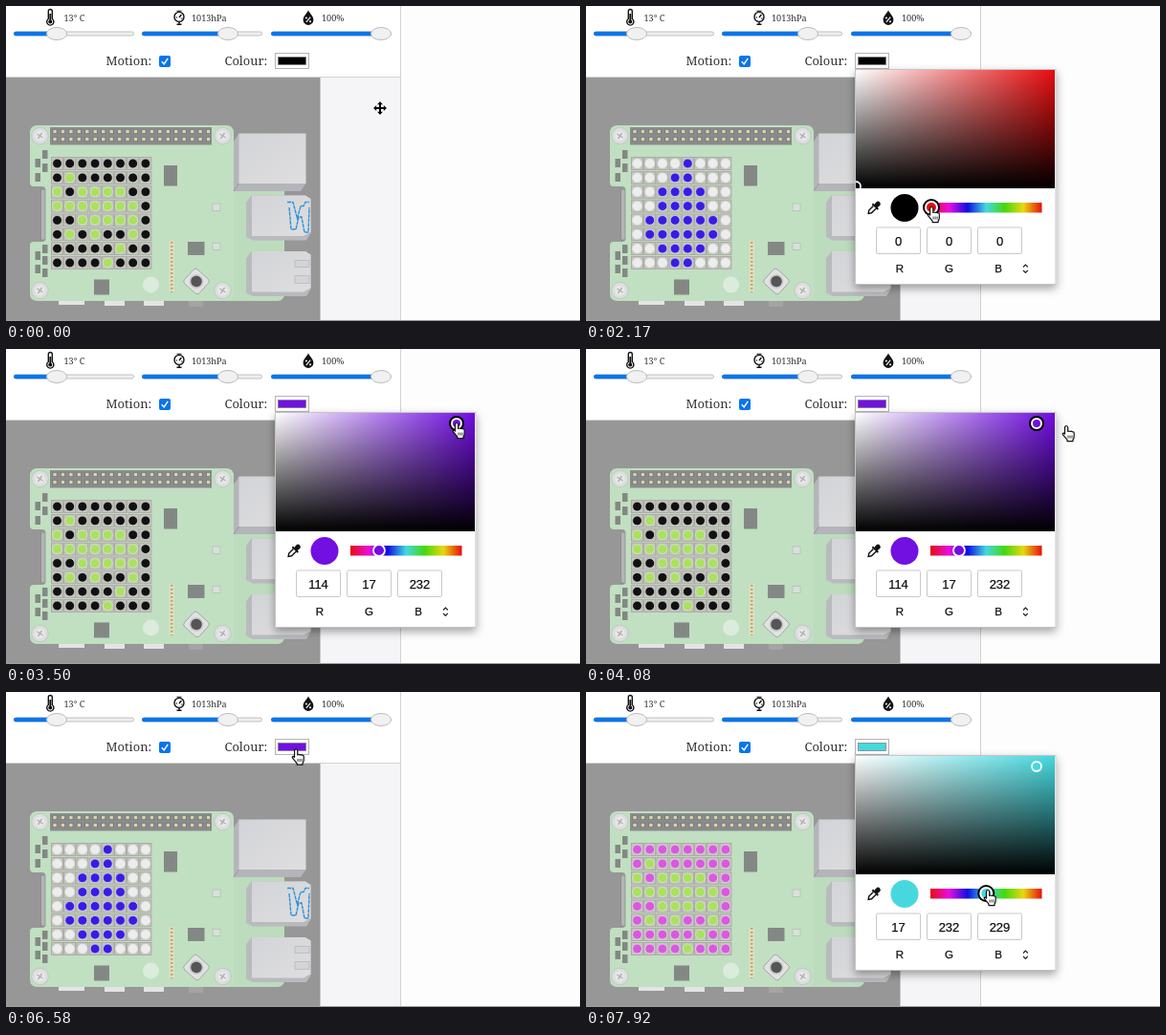
These frames come from a looping animation (600 by 330 pixels, 8000 ms). An HTML page:

```html
<!DOCTYPE html>
<html lang="en">
<head>
<meta charset="utf-8">
<title>Board emulator</title>
<style>
html, body { margin: 0; width: 100%; height: 100%; overflow: hidden; background: #fdfdfd; }
svg { display: block; }
.serif { font-family: "Noto Serif", serif; fill: #333; }
.sans { font-family: "Liberation Sans", Arial, sans-serif; fill: #111; stroke: #111; stroke-width: .25; text-anchor: middle; }
.cursor { paint-order: stroke; stroke-linejoin: round; }
</style>
</head>
<body>
<svg id="stage" width="600" height="330" viewBox="0 0 600 330">
  <defs>
    <linearGradient id="toWhite"><stop stop-color="#fff"/><stop offset="1" stop-color="#fff" stop-opacity="0"/></linearGradient>
    <linearGradient id="toBlack" x2="0" y2="1"><stop stop-opacity="0"/><stop offset="1"/></linearGradient>
    <linearGradient id="hues"></linearGradient>
    <linearGradient id="metal" x2="1" y2="1"><stop stop-color="#d3d4d8"/><stop offset="1" stop-color="#dededf"/></linearGradient>
    <filter id="shadow" x="-10%" y="-10%" width="120%" height="125%">
      <feDropShadow dx="0" dy="4" stdDeviation="5" flood-opacity=".36"/>
    </filter>
    <clipPath id="fieldClip"><rect x="282" y="67" width="208" height="124"/></clipPath>
  </defs>

  <!-- Page -->
  <rect width="600" height="330" fill="#fdfdfd"/>
  <rect width="412" height="75" fill="#fff"/>
  <rect x="328" y="75" width="84" height="254" fill="#f5f5f8"/>
  <rect y="75" width="328.5" height="254" fill="#979797"/>
  <path d="M0 74.5H412M412.5 0V329" stroke="#d2d2d6"/>

  <!-- Controls -->
  <g id="sliders"></g>
  <g fill="none" stroke="#111" stroke-width="1.4">
    <path d="M44.3 13.5V5.5a2 2 0 0 1 4 0v8a3.6 3.6 0 1 1-4 0z"/>
    <path d="M46.3 8v8" stroke-width="1.8"/><circle cx="46.3" cy="16.6" r="2" fill="#111" stroke="none"/>
    <circle cx="181" cy="11.4" r="5"/><path d="M181 12l2.4-3M177.8 12h1M183.4 13h1M178.5 19.2h5M181 17v2"/>
    <path d="M178.5 5.2h5" stroke-width="1"/>
  </g>
  <path d="M316 4.5c2.2 3.8 5.4 6.6 5.4 10a5.4 5.4 0 0 1-10.8 0c0-3.4 3.2-6.2 5.4-10z" fill="#111"/>
  <path d="M313.8 16.8l4.4-5.2" stroke="#fff" stroke-width="1.1"/>
  <circle cx="313.9" cy="12.4" r="1" fill="#fff"/><circle cx="318" cy="16.2" r="1" fill="#fff"/>
  <g class="serif" font-size="9.1">
    <text x="60.5" y="15.5">13° C</text><text x="194" y="15.5">1013hPa</text><text x="330" y="15.5">100%</text>
  </g>
  <g class="serif" font-size="12.9"><text x="104.5" y="62">Motion:</text><text x="228.5" y="62">Colour:</text></g>
  <rect x="160" y="52" width="12" height="12" rx="2" fill="#0875ec"/>
  <path d="M162.8 58.2l2.4 2.7 4-6" fill="none" stroke="#fff" stroke-width="1.5"/>
  <rect x="281.5" y="49.5" width="35" height="16" fill="#fff" stroke="#b4b4b4"/>
  <rect id="swatch" x="284.5" y="53.5" width="29" height="8" stroke="#777" stroke-width=".7"/>

  <!-- Board -->
  <rect x="180" y="180" width="111" height="129" rx="7" fill="#bcdcbd"/>
  <g fill="#e4e4e6">
    <path d="M55 308h27v5H55zM103 308h21v6h-21zM144 308h21v6h-21z"/>
    <path d="M191 308h15v7h-15z" fill="#a4a4a4"/>
  </g>
  <path d="M33 125H230q8 0 8 8V301q0 8-8 8H33q-8 0-8-8V251q0-4 4-4h9q3 0 3-3V192q0-3-3-3H29q-4 0-4-4V133q0-8 8-8z" fill="#c1dfc1"/>
  <rect x="36.5" y="192" width="4.5" height="53" fill="#b3b4b6" stroke="#808080" stroke-width=".6"/>
  <g id="header"></g>
  <g id="screws"></g>
  <g id="chips" fill="#838885"></g>
  <g fill="#d9e0db" stroke="#aebfae" stroke-width=".7"><rect x="216" y="207" width="8" height="7.5"/><rect x="216" y="248.5" width="8" height="7"/></g>
  <path d="M170.5 246h5.5v54h-5.5z" fill="#dedfc6"/>
  <path d="M173.2 247v53" stroke="#c2a55c" stroke-width="2.5" stroke-dasharray="1.8 2.2"/>
  <circle cx="151.5" cy="292" r="8.5" fill="#dcecdc"/>
  <g transform="translate(199 288.5) rotate(42)">
    <rect x="-10.5" y="-10" width="21" height="20" rx="3" fill="#e2e2e3" stroke="#98a098" stroke-width=".8"/>
    <circle r="7.5" fill="#c8c9ca"/><circle r="5.8" fill="#555"/>
  </g>
  <path d="M243.5 133.5L238 142V194H308L313.5 186z" fill="#b4b5ba"/>
  <path d="M243.5 133.5h70V186h-70z" fill="url(#metal)"/>
  <path d="M243.5 186L238 194" stroke="#999"/>
  <g id="ports"></g>
  <path d="M294 205.5h6l4.5 17 3.5-13h3l2-4h4M296 211l2 23h5l3-13h3l3 16h4l1-26" fill="none" stroke="#2b92dc" stroke-width="1.4" stroke-dasharray="4 .7"/>
  <g id="leds"></g>
  <path d="M0 329.5H600" stroke="#a0a0a0"/>

  <!-- Colour picker -->
  <g id="picker">
    <rect x="281" y="66" width="210.5" height="226" rx="1" fill="#fff" filter="url(#shadow)"/>
    <rect x="281.5" y="66.5" width="209.5" height="225" fill="#fff" stroke="#c4c4c4"/>
    <rect id="field" x="282" y="67" width="208" height="124"/>
    <rect x="282" y="67" width="208" height="124" fill="url(#toWhite)"/>
    <rect x="282" y="67" width="208" height="124" fill="url(#toBlack)"/>
    <g clip-path="url(#fieldClip)"><g id="fieldThumb"></g></g>
    <g transform="translate(301 211.5) rotate(45)" fill="#111">
      <rect x="-2.5" y="-8.5" width="5" height="6.5" rx="2.3"/><rect x="-4.2" y="-3" width="8.4" height="2.2" rx=".8"/>
      <path d="M-1.9-1V5.5L0 8.3 1.9 5.5V-1" fill="#fff" stroke="#111" stroke-width="1.4"/>
    </g>
    <circle id="sample" cx="333" cy="211.5" r="14.5"/>
    <rect x="360" y="206" width="116.5" height="10.5" fill="url(#hues)"/>
    <g id="hueThumb"></g>
    <g id="inputs"></g>
    <path d="M457 273.5l2.4-2.4 2.4 2.4M457 277l2.4 2.4 2.4-2.4" fill="none" stroke="#222" stroke-width="1.2"/>
  </g>

  <g id="pointer">
    <path class="cursor" id="move" d="M0-7l3 3.2H1V-1H3.8V-3L7 0 3.8 3V1H1V3.8H3L0 7-3 3.8H-1V1H-3.8V3L-7 0-3.8-3V-1H-1V-3.8H-3z" stroke="#fff" stroke-width="1.6"/>
    <path class="cursor" id="arrow" d="M0 0v13l3-2.8 2 4.8 2.2-1-2-4.6H9z" stroke="#fff" stroke-width="1.6"/>
    <g id="hand">
      <path d="M-1.5 1.5q0-2 1.6-2t1.6 2v4q1.2-1 2.4 0 1.3-.8 2.3.3 1.8-.4 1.8 1.4v3.5q0 2-1.2 3.3v1.6H1v-1.5L-3.6 8.6q-.6-1.7 1-1.6l1.1 1z" fill="#fff" stroke="#111" stroke-width="1.2" stroke-linejoin="round"/>
      <path d="M2 9.5v3M4 9.5v3M6 9.5v3" stroke="#111" stroke-width=".8"/>
    </g>
  </g>
</svg>
<script>
const LOOP = 8000;
const $ = id => document.getElementById(id);
const fill = (id, count, make) => {
  $(id).innerHTML = Array.from({ length: count }, (_, i) => make(i)).join('');
};
const rect = (x, y, w, h, more = '') => `<rect x="${x}" y="${y}" width="${w}" height="${h}" ${more}/>`;
const circle = (x, y, r, more = '') => `<circle cx="${x}" cy="${y}" r="${r}" ${more}/>`;

function hsv(h, s, v) {
  return [5, 3, 1].map(n => {
    const k = (n + h / 60) % 6;
    return Math.round(255 * v * (1 - s * Math.max(0, Math.min(k, 4 - k, 1))));
  });
}
// Softens greens and cyans the way a wide-gamut screen shows them
const css = ([r, g, b]) => `rgb(${r + 0.25 * Math.max(0, g - r)}, ${g * 0.93}, ${b * 0.97})`;
const vivid = h => css(hsv(h, 0.94, 0.91));

// Static parts
const sliderSet = [[8, 53], [142, 232], [277, 392]];
fill('sliders', 3, i => {
  const [x, thumb] = sliderSet[i];
  return rect(x + 0.5, 27, 125, 4, 'rx="2" fill="#eee" stroke="#b4b4b4" stroke-width=".8"') +
    rect(x, 26.7, thumb - x, 4.6, 'rx="2.3" fill="#0875ec"') +
    `<ellipse cx="${thumb}" cy="29" rx="10.5" ry="6.5" fill="#f1f1f2" stroke="#bbb"/>`;
});
fill('hues', 7, i => `<stop offset="${i / 6}" stop-color="${vivid(360 - i * 60)}"/>`);
fill('header', 41, i => {
  if (!i) return rect(46, 127, 169, 18.5, 'fill="#8a8b8c"');
  const x = 48.5 + (i - 1) % 20 * 8.45, y = i > 20 ? 137 : 129;
  return rect(x, y, 5, 5, 'fill="#767778"') + rect(x + 0.8, y + 0.8, 3.4, 3.4, 'fill="#d8d4ac"');
});
fill('screws', 4, i => {
  const x = i % 2 ? 226.5 : 35.5, y = i > 1 ? 298 : 136;
  return circle(x, y, 8.7, 'fill="#dcdedf" stroke="#b8c0b8" stroke-width=".7"') + circle(x, y, 5.2, 'fill="#e8e8e9"') +
    `<path d="M${x - 3} ${y - 2}l6 4M${x + 2} ${y - 3}l-4 6" stroke="#b0b0b0" stroke-width="1.4"/>`;
});
const small = [[30.5, 160], [38, 151], [38, 165], [30.5, 175], [30.5, 257], [38, 250], [30.5, 271], [38, 262], [38, 275]];
$('chips').innerHTML = rect(165, 167, 14, 21.5) + rect(190, 247, 17.5, 14) + rect(92, 286.5, 16, 16) +
  small.map(([x, y]) => rect(x, y, 5.5, 9)).join('');
fill('ports', 2, i => `<g transform="translate(0 ${i * 58.5})">` +
  '<path d="M256.5 198.500L251 206V242L258 245.500H314L318.500 238V202L312 198.500z" fill="#b9babe"/>' +
  '<path d="M257 198.500H313L318.500 202V237L311 241H257z" fill="url(#metal)"/>' +
  (i ? '<path d="M302 208h15v7h-15zM302 224h15v8h-15z" fill="#d3d4d7" stroke="#b4b5ba" stroke-width=".7"/>' : '') + '</g>');
fill('leds', 64, i => {
  const x = 53.5 + i % 8 * 13.2, y = 165 + (i >> 3) * 14.86;
  return rect(x - 6, y - 6.5, 12, 13, 'fill="#c3c4c2" stroke="#a8a49c" stroke-width=".8"') +
    circle(x, y, 4.9, 'stroke="#e4e4e2" stroke-width=".7"');
});
fill('inputs', 3, i => {
  const x = 303.5 + i * 53;
  return rect(x, 232, 46, 27.5, 'rx="1.5" fill="#fff" stroke="#c9c9c9"') +
    `<text class="sans value" x="${x + 23}" y="250.5" font-size="13"></text>` +
    `<text class="sans" x="${328 + i * 51.6}" y="279" font-size="11.5">${'RGB'[i]}</text>`;
});
const leds = [...$('leds').querySelectorAll('circle')];
const values = [...document.querySelectorAll('.value')];

// Pictures on the LED matrix, one string per row
const FISH = ['........', '.#......', '#.####..', '#######.', '..#####.', '.#.#..#.', '.....#..', '....#...'].join('');
const DROP = ['....#...', '...##...', '..####..', '..####..', '.######.', '.######.', '..####..', '...##...'].join('');

// Tracks: [seconds, value...]
const POINTER = [
  [0, 391, 107], [0.3, 391, 107], [1.05, 297, 60], [1.3, 293, 62], [1.6, 293, 62],
  [2.15, 361, 211], [2.7, 390, 211], [3, 390, 211], [3.5, 471, 78], [3.65, 471, 78],
  [4, 502, 81], [4.8, 502, 81], [5.05, 499, 80], [5.7, 448.5, 77], [5.95, 448.5, 77],
  [6.65, 299, 60], [6.85, 299, 60], [7.08, 333, 138], [7.4, 390, 209], [7.9, 420, 208], [8, 420, 208]
];
const HUE = [[0, 360], [2.2, 360], [2.7, 267], [7.45, 267], [7.9, 179.2], [8, 179.2]];

function sample(track, t) {
  const i = Math.max(1, track.findIndex(step => step[0] > t));
  const a = track[i - 1], b = track[i];
  const p = (t - a[0]) / (b[0] - a[0]);
  const eased = p * p * (3 - 2 * p);
  return a.slice(1).map((from, k) => from + (b[k + 1] - from) * eased);
}

function thumb(id, x, y, r, color, focused) {
  $(id).innerHTML = focused
    ? circle(x, y, r + 3, 'fill="#000"') + circle(x, y, r, `fill="${color}" stroke="#fff" stroke-width="2"`)
    : circle(x, y, r, `fill="${color}" stroke="#fff" stroke-width="1.8"`);
}

function draw(t) {
  const [x, y] = sample(POINTER, t);
  const [hue] = sample(HUE, t);
  const open = t >= 1.2 && t < 4.6 || t >= 6.8;
  const picked = t >= 3.5;
  const rgb = picked ? hsv(hue, 0.927, 0.91) : [0, 0, 0];
  const color = css(rgb);

  const fish = t < 1.25 || t >= 3.25 && t < 5.25 || t >= 7.25;
  const back = !fish ? '#ededed' : t > 7 ? '#da58e0' : '#111';
  const front = fish ? '#a9e25c' : '#381ce6';
  leds.forEach((led, i) => led.setAttribute('fill', (fish ? FISH : DROP)[i] === '#' ? front : back));

  $('swatch').setAttribute('fill', color);
  $('sample').setAttribute('fill', color);
  $('field').setAttribute('fill', vivid(hue));
  $('picker').style.display = open ? '' : 'none';
  values.forEach((el, i) => { el.textContent = rgb[i]; });

  const onHue = t > 2.15 && t < 3.5 || t > 7.4;
  thumb('hueThumb', Math.max(361, 476 - hue / 360 * 116), 211, 6, vivid(hue), onHue);
  thumb('fieldThumb', picked ? 471 : 282, picked ? 78 : 189, 5, color, !onHue);

  const onSwatch = x > 281 && x < 317 && y > 49 && y < 66;
  const kind = open || onSwatch ? 'hand' : x < 412 && y > 75 ? 'move' : 'arrow';
  for (const id of ['hand', 'move', 'arrow']) $(id).style.display = id === kind ? '' : 'none';
  $('pointer').setAttribute('transform', `translate(${x} ${y})`);
}

const start = performance.now();
function tick(now) {
  draw(Math.max(0, now - start) % LOOP / 1000);
  requestAnimationFrame(tick);
}
draw(0);
requestAnimationFrame(tick);
</script>
</body>
</html>
```
